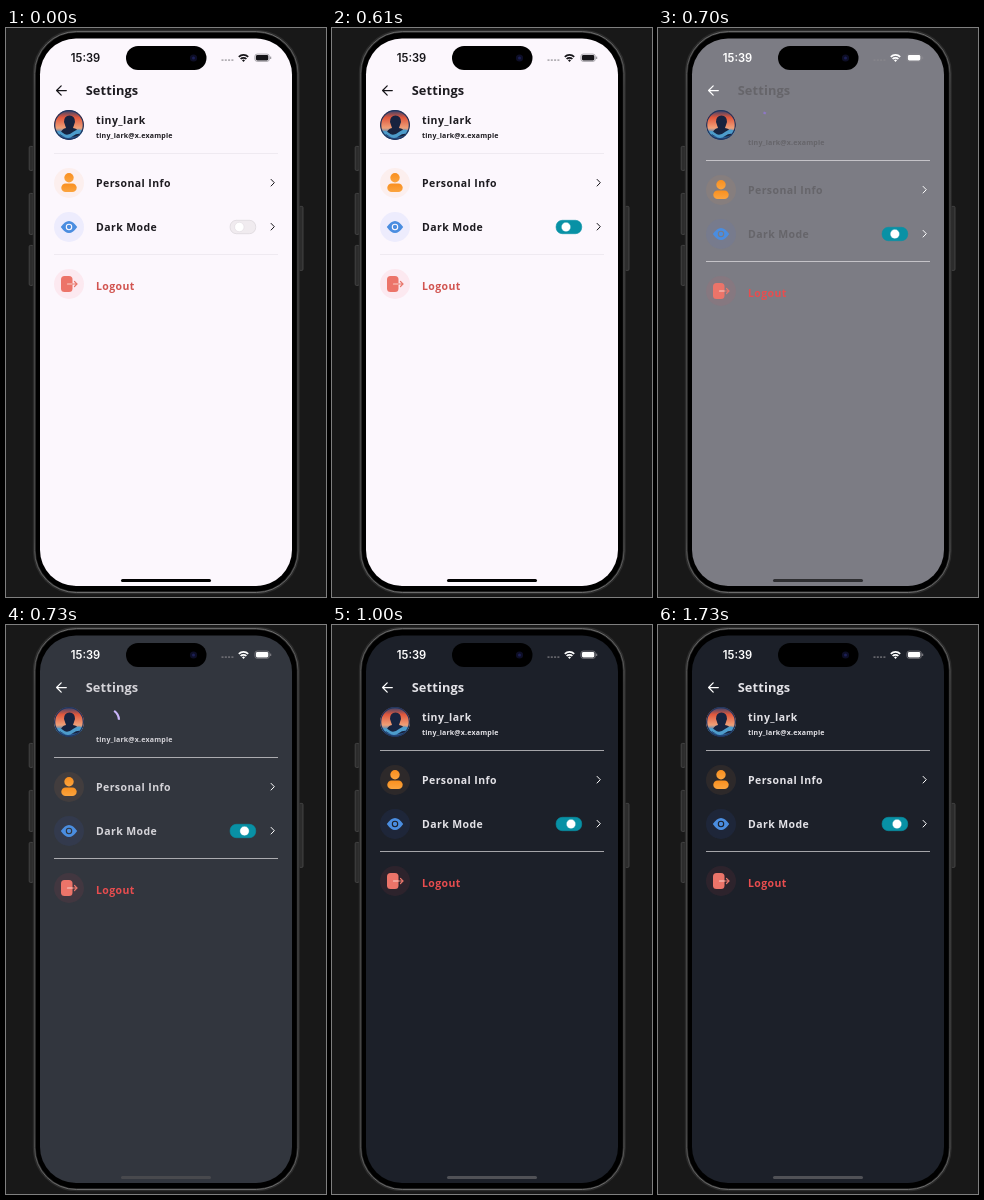
Animation of 320 by 569 pixels, one loop 1760 ms. Source, as an HTML page:

```html
<!DOCTYPE html>
<html lang="en">
<head>
<meta charset="utf-8">
<title>Settings theme switch</title>
<style>
html, body { margin: 0; height: 100%; overflow: hidden; background: #181818; }
svg { display: block; width: 320px; height: 569px; }
text { font: 700 10.5px "Open Sans", "Noto Sans", sans-serif; fill: var(--text); letter-spacing: .42px; }
.title { font-size: 12.8px; letter-spacing: .12px; }
.mail { font-size: 7.05px; letter-spacing: .18px; }
.time { font: 600 11.2px Inter, Roboto, sans-serif; letter-spacing: 0; fill: var(--icon); }
.logout { fill: var(--red); }
.line { fill: none; stroke: var(--icon); stroke-width: 1.25; stroke-linecap: round; stroke-linejoin: round; }
.chevron { stroke-width: 1; }
.rule { stroke: var(--rule); }
.solid { fill: var(--icon); }
.stroke { fill: none; stroke-width: 1.2; stroke-linecap: round; }
</style>
</head>
<body>
<svg viewBox="0 0 320 569">
  <defs>
    <linearGradient id="metal" x2="0" y2="1">
      <stop stop-color="#6c6c6c"/><stop offset=".1" stop-color="#484848"/>
      <stop offset=".9" stop-color="#484848"/><stop offset="1" stop-color="#6c6c6c"/>
    </linearGradient>
    <linearGradient id="amber" x2="0" y2="1">
      <stop stop-color="#f98f1e"/><stop offset="1" stop-color="#fba43f"/>
    </linearGradient>
    <linearGradient id="sky" x2="0" y2="1">
      <stop stop-color="#2b4270"/><stop offset=".25" stop-color="#e0573d"/>
      <stop offset=".6" stop-color="#f0a078"/><stop offset=".75" stop-color="#3f86bd"/>
      <stop offset="1" stop-color="#1b3f77"/>
    </linearGradient>
    <clipPath id="round"><circle cx="63" cy="97" r="15"/></clipPath>
  </defs>

  <!-- phone body -->
  <g fill="#2c2c2c" stroke="#4c4c4c" stroke-width=".8">
    <rect x="23.2" y="118.4" width="4" height="24" rx="1.2"/>
    <rect x="23.2" y="165.4" width="4" height="41" rx="1.2"/>
    <rect x="23.2" y="217.4" width="4" height="40" rx="1.2"/>
    <rect x="293" y="178.4" width="4" height="64" rx="1.2"/>
  </g>
  <rect x="28.3" y="3.3" width="264" height="561.5" rx="42" fill="#000" stroke="#2b2b2b" stroke-width="3"/>
  <rect x="28.6" y="3.6" width="263.4" height="560.9" rx="41.7" fill="none" stroke="url(#metal)"/>
  <rect x="34" y="10.5" width="252" height="547.5" rx="36" fill="var(--bg)"/>

  <!-- status bar -->
  <text class="time" x="64.8" y="34">15:39</text>
  <rect x="120" y="18" width="80.5" height="24" rx="12"/>
  <circle cx="187.5" cy="30" r="3.6" fill="#0d0e26"/>
  <circle cx="187.5" cy="30" r="1.5" fill="#1c1f55"/>
  <path d="M215.5 32.2h12" stroke="#8a888e" stroke-opacity=".65" stroke-width="1.8" stroke-dasharray="2 1.3"/>
  <path class="line" style="stroke-width:1.7;stroke-linecap:butt" d="M232.8 28.8a6.7 6.7 0 0 1 9.4 0M234.6 31a4.1 4.1 0 0 1 5.8 0"/>
  <path class="solid" d="M237.5 34l-1.5-1.7a2.2 2.2 0 0 1 3 0z"/>
  <rect x="248.9" y="26.1" width="14.4" height="7.3" rx="2.3" fill="none" stroke="#8a888e" stroke-width=".7"/>
  <rect class="solid" x="249.9" y="27.1" width="12.4" height="5.3" rx="1.4"/>
  <path d="M264.7 28.6v2.4" stroke="#8a888e"/>

  <!-- header and profile -->
  <path class="line" d="M60.3 62.5h-9.7m4.6-4.6l-4.6 4.6l4.6 4.6"/>
  <text class="title" x="79.7" y="67">Settings</text>
  <g clip-path="url(#round)">
    <path fill="url(#sky)" d="M48 82h30v30H48z"/>
    <path fill="#17233f" d="M54 107q1-6 6-7l-2-6q0-6.500 5.500-6.500t5.500 6.500l-2 6q6 1 7 7q-10 4-20 0z"/>
    <path fill="#4d9ccb" d="M48 105q5-4 9 0t10-1t11 0v3q-6-3-11 1t-10 0t-9 0z"/>
    <circle cx="63" cy="97" r="14.4" fill="none" stroke="#22375f" stroke-width="1.4"/>
  </g>
  <text id="name" x="90" y="95.5">tiny_lark</text>
  <path id="spin" fill="none" stroke="var(--spin)" stroke-width="2.2"/>

  <g id="list">
    <text class="mail" x="90" y="110">tiny_lark@x.example</text>
    <path class="rule" d="M48 125.5h224M48 226.5h224"/>

    <circle cx="63" cy="155" r="15" fill="#ff963c" fill-opacity=".08"/>
    <g fill="url(#amber)">
      <circle cx="63" cy="149.7" r="4.7"/>
      <rect x="55.3" y="155.4" width="15.4" height="8.6" rx="4.3"/>
    </g>
    <text x="90" y="159">Personal Info</text>
    <path class="line chevron" d="M265.1 151.4l3.2 3.3l-3.2 3.3"/>

    <circle cx="63" cy="199" r="15" fill="#3c78ff" fill-opacity=".08"/>
    <path fill="#4a8de0" d="M54.8 199q8.2-12 16.4 0q-8.2 12-16.4 0z"/>
    <circle cx="63" cy="199" r="2.7" fill="none" stroke="var(--bg)" stroke-width="1.1"/>
    <text x="90" y="203">Dark Mode</text>
    <rect x="224.1" y="192.3" width="25.6" height="13.4" rx="6.2" fill="var(--track)" stroke="var(--edge)" stroke-width=".6"/>
    <circle id="knob" cy="199" r="4.7" fill="#fff" stroke="var(--edge)" stroke-width=".4"/>
    <path class="line chevron" d="M265.1 195.4l3.2 3.3l-3.2 3.3"/>

    <circle cx="63" cy="256" r="15" fill="#ff505a" fill-opacity=".08"/>
    <rect x="55" y="248" width="11.5" height="16" rx="3.5" fill="#ec7469"/>
    <path class="stroke" d="M61.5 256h5" stroke="#f9cfc8"/>
    <path class="stroke" d="M66.5 256h4.5m-2.5-2.5l2.5 2.5l-2.5 2.5" stroke="#e8766b"/>
    <text class="logout" x="90" y="262">Logout</text>
  </g>
  <rect x="115" y="551" width="90" height="3" rx="1.5" fill="var(--home)"/>
</svg>

<script>
const LOOP = 1760, TAP = 610, STEP = 30, LOAD = 670, DONE = 1000;
const BG_FADE = [0, .04, .16, .57, .9, 1];
const TEXT_FADE = [0, .04, .16, .37, .93, 1];
const $ = id => document.getElementById(id);
const root = document.documentElement.style;
const mix = (a, b, p) => `rgb(${a.map((v, i) => Math.round(v + (b[i] - v) * p))})`;
const clamp = v => Math.min(1, Math.max(0, v));

// cubic-bezier(.4, 0, .2, 1)
function ease(x) {
  let lo = 0, hi = 1, s = x;
  for (let i = 0; i < 20; i++) {
    s = (lo + hi) / 2;
    const bx = 1.2 * s * (1 - s) ** 2 + .6 * s * s * (1 - s) + s ** 3;
    if (bx < x) lo = s; else hi = s;
  }
  return 3 * s * s * (1 - s) + s ** 3;
}

function spinnerPath(age) {
  const start = 360 * age / 2222 + 90 * age / 1333;
  const sweep = Math.max(8, 270 * (ease(clamp(age / 667)) - ease(clamp(age / 667 - 1))));
  const point = deg => {
    const a = deg * Math.PI / 180;
    return `${101.5 + 11.5 * Math.sin(a)} ${95.3 - 11.5 * Math.cos(a)}`;
  };
  return `M${point(start)}A11.5 11.5 0 ${+(sweep > 180)} 1 ${point(start + sweep)}`;
}

function draw(ms) {
  const on = ms >= TAP;
  const step = on ? Math.floor((ms - TAP) / STEP) : 0;
  const time = TAP + step * STEP;
  const at = list => list[Math.min(step, list.length - 1)];
  const p = at(BG_FADE), q = at(TEXT_FADE);
  const loading = on && time >= LOAD && ms < DONE;
  const colors = {
    bg: mix([252, 247, 253], [28, 32, 41], p),
    text: mix([29, 27, 32], [227, 226, 231], q),
    icon: p > .5 ? "#fff" : "#151418",
    rule: mix([239, 234, 241], [165, 165, 169], p),
    red: mix([209, 84, 80], [232, 77, 79], clamp(p * 3)),
    home: mix([0, 0, 0], [80, 81, 86], p),
    spin: mix([103, 80, 164], [208, 188, 255], q),
    track: on ? "#0891a5" : "#f0ebef",
    edge: on ? "#0891a5" : "#d6d0d6"
  };
  for (const key in colors) root.setProperty("--" + key, colors[key]);
  $("knob").setAttribute("cx", on ? 234 + 5 * p : 233.3);
  $("name").style.display = loading ? "none" : "";
  $("spin").setAttribute("d", loading ? spinnerPath((time - 660) * 2.2) : "");
  $("list").setAttribute("transform", `translate(0 ${loading ? 7 : 0})`);
}

const begin = performance.now();
function tick() {
  draw((performance.now() - begin) % LOOP);
  requestAnimationFrame(tick);
}
tick();
</script>
</body>
</html>
```
